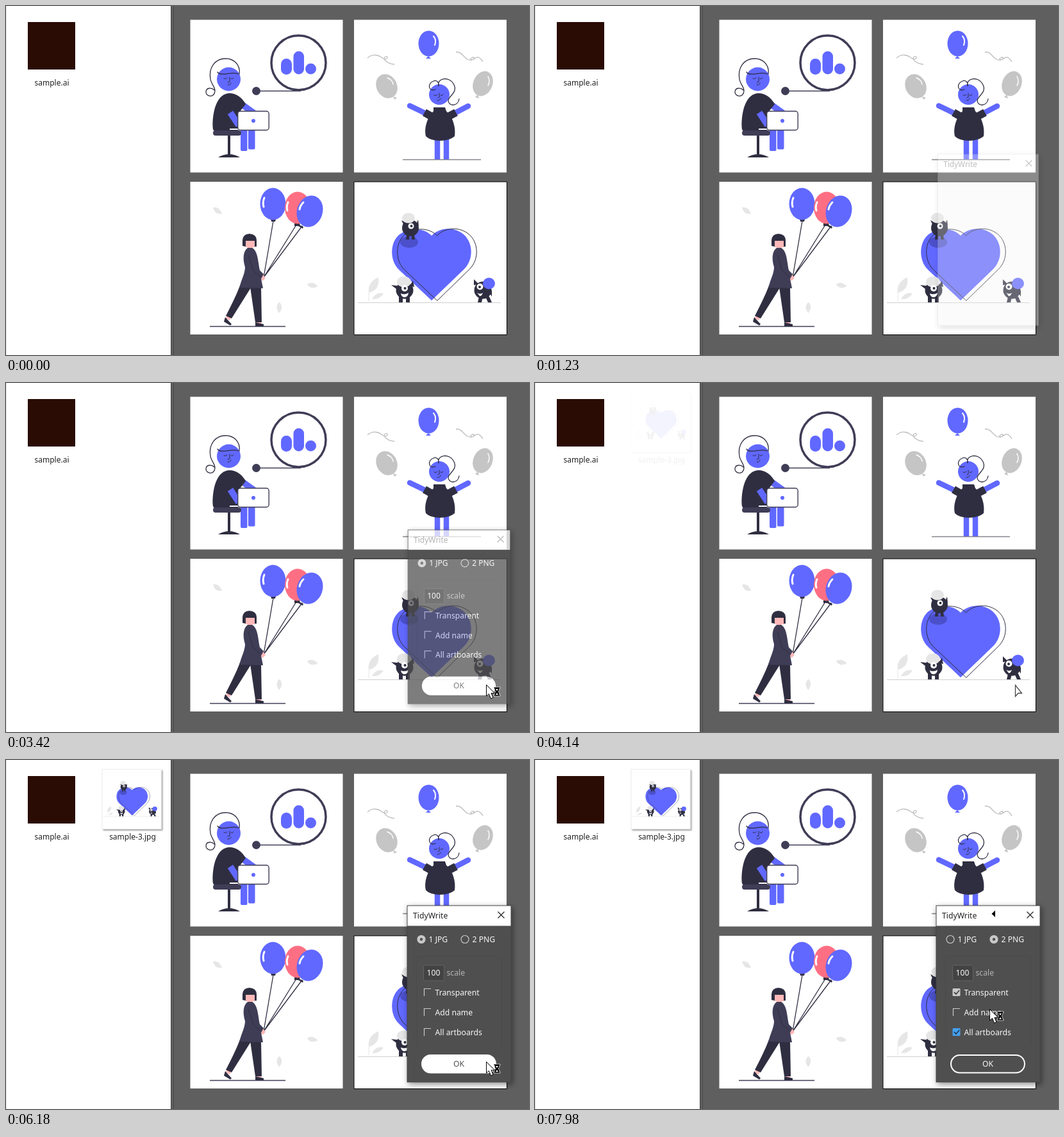
Recreate the animation shown at these times as an HTML page. Size 816 by 544 pixels, loop 8 s.

```html
<!DOCTYPE html>
<html lang="en">
<head>
<meta charset="utf-8">
<title>Artboard export</title>
<style>
  html, body { margin: 0; width: 100%; height: 100%; overflow: hidden; background: #fff; }
  svg { display: block; width: 816px; height: 544px; }
  text { font: 12.2px "Noto Sans", "Open Sans", sans-serif; }
  .file { font-size: 12px; text-anchor: middle; fill: #222; }
  .blue { fill: #6168ff; }
  .dark { fill: #2f2e41; }
  .line { fill: none; stroke: #2f2e41; stroke-width: 1.3; stroke-linecap: round; }
  .limb { fill: none; stroke: #6168ff; stroke-width: 10; }
  .shine { fill: none; stroke: #fff; stroke-width: 3; stroke-linecap: round; }
  .grey { fill: #c5c5c5; }
  .pale { fill: #e6e6e6; }
</style>
</head>
<body>
<svg viewBox="0 0 816 544">
  <defs>
    <filter id="shadow" x="-20%" y="-20%" width="140%" height="140%">
      <feDropShadow dx="2" dy="3" stdDeviation="5" flood-opacity=".45"/>
    </filter>
    <filter id="softShadow" x="-10%" y="-10%" width="125%" height="125%">
      <feDropShadow dx="2" dy="2" stdDeviation="1" flood-opacity=".35"/>
    </filter>
    <path id="heart" d="M664 459L613 411C598 396 599 368 614 356C630 344 653 346 664 358C677 344 700 344 714 356C729 369 730 395 715 410Z"/>
    <path id="leaf" d="M-8-5Q2-7 6 5Q-6 6-8-5Z" class="pale"/>

    <g id="heartScene">
      <path d="M549 462.5H772" stroke="#cfcfcf"/>
      <path class="pale" d="M566 447C564 434 573 426 581 423C583 436 578 444 566 447ZM571 457Q577 445 589 448Q583 458 571 457Z"/>
      <path d="M566 460V447" stroke="#e6e6e6"/>
      <use href="#heart" class="blue"/>
      <use href="#heart" x="8.5" class="line" style="stroke-width:1"/>
      <ellipse cx="629" cy="368" rx="14" ry="9" fill="#30348a" opacity=".45"/>
      <g class="dark">
        <circle cx="631" cy="346" r="13"/>
        <path d="M625 356h4v8h-5zM633 356h4l1 8h-5zM620 340l-3-6 6 3zM640 340l3-7 1 10z"/>
        <circle cx="622" cy="443" r="13.5"/>
        <path d="M613 452h6v10h-6zM624 452h6v10h-6zM613 444l-12-9 9 1 8 6zM630 436l5-8 2 10z"/>
        <circle cx="744" cy="443" r="13.5"/>
        <path d="M738 453h6l-2 9h-6zM748 453h6l4 9h-6zM738 434l-8-8v9zM753 445l5-2v10z"/>
      </g>
      <ellipse cx="628" cy="330.500" rx="10" ry="8" class="pale"/>
      <ellipse cx="621" cy="430" rx="11" ry="8.500" class="pale"/>
      <ellipse cx="753.500" cy="432.500" rx="9.500" ry="9" class="blue"/>
      <g fill="#fff">
        <circle cx="632" cy="343" r="4.500"/>
        <circle cx="622" cy="440" r="5"/>
        <circle cx="739.500" cy="437.500" r="5"/>
        <path d="M616 448q6 3 12-1q-1 7-6 7t-6-6zM735 447q5 3 9 0q-2 6-5 5z"/>
      </g>
      <g class="dark">
        <circle cx="632.500" cy="343" r="2"/>
        <circle cx="622.500" cy="440" r="2"/>
        <circle cx="739" cy="438" r="2"/>
      </g>
    </g>
  </defs>

  <!-- Workspace -->
  <path d="M0 0H816V544H0Z" fill="#fff"/>
  <path d="M.5 0V544" stroke="#e4e4e4"/>
  <path d="M257 0H816V544H257Z" fill="#5f5f5f"/>
  <path d="M257.500 0V544M261.500 0V544" stroke="#484848"/>
  <path d="M287.500 21.500h238v238h-238zM543 21.500h238v238h-238zM287.500 274h238v238h-238z" fill="#fff"/>
  <path d="M543 274h238.500v238.500h-238.500z" fill="#fff" stroke="#000"/>

  <!-- Seated figure with laptop -->
  <g>
    <circle cx="456.500" cy="88.500" r="42.500" fill="#fff" stroke="#3f3d56" stroke-width="3.500"/>
    <path d="M390 132.500H460" stroke="#3f3d56" stroke-width="1.500"/>
    <circle cx="390.500" cy="132.500" r="6.500" fill="#3f3d56"/>
    <g class="blue">
      <rect x="429" y="82" width="17" height="25" rx="8.500"/>
      <rect x="448.500" y="70.500" width="16.500" height="36" rx="8.200"/>
      <circle cx="475.500" cy="98" r="8.500"/>
      <circle cx="347.500" cy="114" r="18.500"/>
      <rect x="366" y="191" width="10.500" height="35" rx="2"/>
      <rect x="378" y="191" width="10.500" height="32.500" rx="2"/>
    </g>
    <path class="line" d="M364 106C366 90 354 82 343 82C325 82 316 97 319 114C320 121 326 126 326 132C326 144 311 142 312 133C313 127 321 127 325 131M330 103C336 111 354 101 362 106"/>
    <path class="line" d="M340 113q3 2 5-1M351 113q2 2 4-1M349 111v7l-3 1M346 123q4 1 5-3" style="stroke-width:1"/>
    <path class="limb" d="M366 152L387 167"/>
    <path class="dark" d="M349 136C330 136 322 162 322.500 188Q322 197 332 197H362L366 163L374 153C369 143 359 136 349 136Z"/>
    <path class="limb" d="M350 166L363 186"/>
    <rect x="323" y="194" width="44" height="8" rx="4" fill="#3f3d56"/>
    <path d="M348 202V233" stroke="#2f2e41" stroke-width="4"/>
    <path class="dark" d="M331 236Q348 226 365 236Z"/>
    <path d="M349 192H364" stroke="#fff" stroke-width="2"/>
    <rect x="361.700" y="164" width="48.500" height="29.500" rx="4" fill="#fff" stroke="#3f3d56" stroke-width="1.400"/>
    <circle cx="386" cy="179" r="3" class="blue"/>
  </g>

  <!-- Cheering figure -->
  <g>
    <path class="blue" d="M659 78l4 4h-8z"/>
    <ellipse cx="659.500" cy="58.500" rx="16" ry="20" class="blue"/>
    <path class="shine" d="M667 47Q672 53 669 61" style="stroke-width:2"/>
    <g class="grey">
      <ellipse cx="594" cy="125" rx="16" ry="19.500" transform="rotate(-27 594 125)"/>
      <ellipse cx="744" cy="121" rx="15" ry="20" transform="rotate(22 744 121)"/>
      <path d="M604 141l6 2-4 3zM736 138l2 6-6-2z"/>
    </g>
    <path class="shine" d="M595 112Q603 115 604 122M752 110Q756 117 752 124" style="stroke-width:1.500"/>
    <path d="M564 81C572 74 581 76 587 81C595 87 598 77 592 79C586 82 595 90 606 91M702 72C710 70 714 80 720 83C729 87 733 80 728 80C722 82 726 86 731 82C737 77 741 82 744 87" fill="none" stroke="#bdbdbd" stroke-width="1.300"/>
    <path d="M619 239.500H741" stroke="#85858d" stroke-width="1.600"/>
    <path class="limb" d="M673 203V239M687 203V239" style="stroke-width:8.500"/>
    <path class="limb" d="M656 168L630 155.500M700 167L721 156" style="stroke-width:8.500;stroke-linecap:round"/>
    <path d="M669 175L653 166M685 175L702 166" stroke="#2f2e41" stroke-width="12"/>
    <path class="dark" d="M667 158H685L687 164C698 173 702 191 700 203Q692 210 677 210T655 203C652 191 657 173 667 164Z"/>
    <circle cx="676" cy="138" r="16" class="blue"/>
    <path class="line" d="M670 130C659 135 657 120 667 117C672 115 676 119 675 125C672 111 692 110 698 121C706 134 692 139 690 147C690 157 705 157 707 145"/>
    <path class="line" d="M668 139q3 2 5-1M678 139q2 2 4-1M676 136v6l-2 1M673 147q4 1 5-3" style="stroke-width:1"/>
  </g>

  <!-- Walking figure with balloons -->
  <g>
    <use href="#leaf" x="331" y="319"/>
    <use href="#leaf" transform="translate(479 435) rotate(-25)"/>
    <use href="#leaf" transform="translate(427 471) rotate(55)"/>
    <path class="line" d="M417 335L402 423L453 341M402 423L462 343"/>
    <path class="dark" d="M413 332h8l-1 4h-6zM450 338h8l1 5h-9zM457 341l7 3-1 3-7-4z"/>
    <ellipse cx="416.500" cy="308.500" rx="20" ry="25" class="blue"/>
    <ellipse cx="455" cy="314.500" rx="20" ry="25" fill="#ff6f83"/>
    <ellipse cx="474" cy="320" rx="20" ry="25" class="blue" transform="rotate(18 474 320)"/>
    <path class="shine" d="M403 299Q400 306 402 313M440 306Q437 313 439 319M464 306Q459 311 458 317"/>
    <path d="M318 499.500H436" stroke="#3f3d56" stroke-width="1.400"/>
    <path fill="#ffb8b8" d="M374 364H389V376H385V381H377V376H374ZM345 481l7 3-3 6-6-3zM391 490h7v5h-7zM396 421l5-3 4 6-4 4-6-2z"/>
    <path class="dark" d="M369 374V365Q370 355 380 355Q391 356 391 365V375H388V366H374V375ZM365 436H384L352 487L343 483C351 467 359 452 365 436ZM381 438H398L399 493H389Z"/>
    <path fill="#3f3d56" d="M377 377H384C393 382 393 397 396 412L402 418L398 425L401 440L364 439C368 425 373 416 373 407C369 394 370 382 377 377Z"/>
    <path d="M378 388L386 413L397 422" fill="none" stroke="#2f2e41"/>
    <path class="dark" d="M342 485L352 496L350 498L340 492ZM389 493L402 496V499H389Z"/>
  </g>

  <use href="#heartScene"/>

  <!-- File list -->
  <rect x="34" y="25" width="74" height="74" fill="#2a0c04"/>
  <text class="file" x="71.500" y="124">sample.ai</text>
  <g id="savedFile">
    <rect x="150" y="14.500" width="92" height="93" fill="#fff" stroke="#ececec" filter="url(#softShadow)"/>
    <use href="#heartScene" transform="translate(149 13.500) scale(.395) translate(-543 -274)"/>
    <text class="file" x="197.500" y="124">sample-3.jpg</text>
  </g>

  <!-- Export dialog -->
  <g id="dialog">
    <rect id="panel" x="626" y="227" width="162" height="275" stroke="#454545" filter="url(#shadow)"/>
    <rect x="626.500" y="227.500" width="161" height="31" fill="#fff"/>
    <g id="titleBar">
      <text x="635" y="247" fill="currentColor">TidyWrite</text>
      <path d="M767.500 236.500l10 10m0-10l-10 10" stroke="currentColor" stroke-width="1.200"/>
    </g>
    <path id="marker" d="M718 234.500V245L712.500 239.700Z"/>
    <g id="controls" fill="#f8f8f8">
      <g id="radios"></g>
      <text x="659.500" y="284">1 JPG</text>
      <text x="727.500" y="284">2 PNG</text>
      <path d="M640.500 444V306.500H773.500V444" fill="none" stroke="#4a4a4a"/>
      <rect x="651.500" y="320" width="32" height="24" rx="2" fill="#434343" stroke="#626262"/>
      <text x="656.500" y="336">100</text>
      <text x="687.500" y="336" fill="#b4b4b4">scale</text>
      <g id="checks"></g>
      <text x="669.500" y="367">Transparent</text>
      <text x="669.500" y="398">Add name</text>
      <text x="669.500" y="429">All artboards</text>
      <rect id="okButton" x="649" y="460" width="115" height="27.500" rx="13.700" stroke="#fff" stroke-width="2"/>
      <text id="okText" x="706.500" y="478" text-anchor="middle">OK</text>
    </g>
  </g>

  <g id="cursor">
    <path id="plainArrow" d="M.5 1V18.500L5 13.500H10.500Z" fill="#fff" stroke="#444" stroke-width="1.300"/>
    <g id="busyArrow" stroke="#000">
      <path d="M.5.500V18L4.500 14.500L7.500 22L11 20.500L8 13.500H13.500Z" fill="#fff"/>
      <path d="M12 4h10v2h-1q0 4-2 5q2 1 2 5h1v2h-10v-2h1q0-4 2-5q-2-1-2-5h-1z" fill="#000" stroke="#fff" stroke-width=".7"/>
      <path d="M15 7h4l-2 3zM15 16l2-3 2 3z" fill="#fff" stroke="none"/>
    </g>
  </g>
</svg>

<script>
const LOOP = 8000;
const PNG_CLICK = 6790, TRANSPARENT_CLICK = 7140, BOARDS_CLICK = 7460;
const $ = id => document.getElementById(id);
const clamp = v => Math.max(0, Math.min(1, v));
const progress = (t, from, to) => clamp((t - from) / (to - from));
const ease = p => p * p * (3 - 2 * p);
const show = (id, on) => $(id).setAttribute("visibility", on ? "inherit" : "hidden");

// Cursor stops: time, x, y
const stops = [
  [2580, 816, 410], [3120, 749, 470], [6330, 749, 470], [6690, 722, 282],
  [6850, 722, 282], [7080, 690, 362], [7190, 690, 362], [7390, 690, 424],
  [7520, 690, 424], [7800, 709, 388]
];

function cursorAt(t) {
  const next = stops.findIndex(s => s[0] > t);
  if (next < 0) return stops.at(-1).slice(1);
  if (!next) return stops[0].slice(1);
  const [t0, x0, y0] = stops[next - 1], [t1, x1, y1] = stops[next];
  const p = ease(progress(t, t0, t1));
  return [x0 + (x1 - x0) * p, y0 + (y1 - y0) * p];
}

const radio = (x, on) =>
  `<circle cx="${x}" cy="279.500" r="6" fill="${on ? "#c9c9c9" : "none"}" stroke="#c9c9c9" stroke-width="1.200"/>` +
  (on ? `<circle cx="${x}" cy="279.500" r="2.200" fill="#505050"/>` : "");

function check(y, on, focused) {
  if (!on) return `<path d="M652.500 ${y + 6}V${y - 5.5}H663" fill="none" stroke="#c9c9c9" stroke-width="1.200"/>`;
  const [fill, tick] = focused ? ["#44a0ee", "#263e58"] : ["#c9c9c9", "#444"];
  return `<rect x="651.500" y="${y - 6}" width="12" height="12" rx="1.500" fill="${fill}"/>` +
    `<path d="M654 ${y}l3 3 5-6" fill="none" stroke="${tick}" stroke-width="1.800"/>`;
}

function drawDialog(t, overOk) {
  const second = t >= 4500;
  const opening = second ? 5910 : 1170;
  const shown = ease(progress(t, opening - 15, opening + 200));
  const closing = second ? 0 : ease(progress(t, 3360, 3540));
  const opacity = shown * (1 - closing);
  const scale = .957 + .043 * shown - .055 * closing;
  const ready = t >= opening + 90;

  show("dialog", opacity > 0);
  $("dialog").setAttribute("opacity", opacity);
  $("dialog").setAttribute("transform", `translate(707 364.500) scale(${scale}) translate(-707 -364.500)`);
  $("panel").setAttribute("fill", ready ? "#505050" : "#f4f4f4");
  $("panel").setAttribute("stroke", ready ? "#454545" : "#c8c8c8");
  $("titleBar").setAttribute("color", closing ? "#999" : "#222");
  show("controls", ready);
  show("marker", t >= opening + 530 && !closing);

  const png = t >= PNG_CLICK;
  $("radios").innerHTML = radio(648, !png) + radio(716, png);
  $("checks").innerHTML = check(362, t >= TRANSPARENT_CLICK, t < BOARDS_CLICK) +
    check(393, false) + check(424, t >= BOARDS_CLICK, true);
  $("okButton").setAttribute("fill", overOk ? "#fff" : "none");
  $("okText").setAttribute("fill", overOk ? "#505050" : "#f8f8f8");
}

function draw(t) {
  const [x, y] = cursorAt(t);
  const visible = t >= 2580;
  const busy = t < 3660 || t >= 5910;
  drawDialog(t, visible && x < 764 && y > 459);
  $("savedFile").setAttribute("opacity", progress(t, 4125, 4380));
  show("cursor", visible);
  show("busyArrow", busy);
  show("plainArrow", !busy);
  $("cursor").setAttribute("transform", `translate(${x} ${y})`);
}

const start = performance.now();
function frame() {
  draw((performance.now() - start) % LOOP);
  requestAnimationFrame(frame);
}
frame();
</script>
</body>
</html>
```
